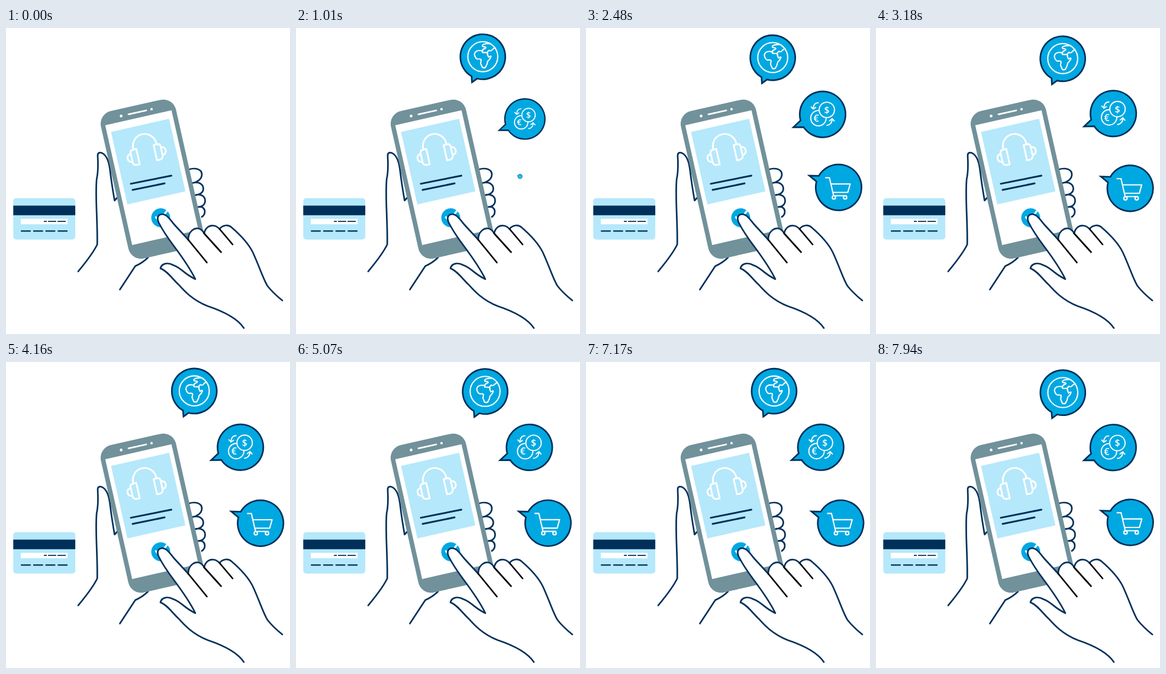
An HTML page that plays this animation: 480x516 px, repeating every 8 s.

```html
<!DOCTYPE html>
<html lang="en">
<head>
<meta charset="utf-8">
<title>Mobile shopping</title>
<style>
  html, body { margin: 0; width: 100%; height: 100%; overflow: hidden; background: #fff; }
  svg { display: block; width: 100%; height: 100%; }
  .line, .white { fill: none; stroke-linecap: round; stroke-linejoin: round; }
  .line { stroke: #00305a; stroke-width: 2.7; }
  .white { stroke: #fff; stroke-width: 2.1; }
  .navy { fill: #00305a; }
  .pale { fill: #b5e8fb; }
  .shape { fill: #00a8e2; stroke: #00305a; stroke-width: 2.7; stroke-miterlimit: 8; }
  .coin { font: 600 16px "Open Sans", sans-serif; fill: #fff; text-anchor: middle; }
  .bubble { visibility: hidden; }
</style>
</head>
<body>
<svg viewBox="0 0 480 516">
  <!-- bank card -->
  <rect class="pale" x="12.3" y="287" width="104.8" height="69.7" rx="5"/>
  <rect class="navy" x="12.3" y="299.5" width="104.8" height="16.2"/>
  <rect x="25" y="321.8" width="79" height="9.2" fill="#fff"/>
  <path d="M64 326.2h5M71 326.2h14M87 326.2h14" stroke="#00305a" stroke-width="1.7"/>
  <path d="M25.2 342.3h16.6M46 342.3h16.6M66.7 342.3h16.6M87.4 342.3h16.6" stroke="#00305a" stroke-width="2.3"/>

  <!-- holding hand -->
  <g class="line">
    <path d="M122 410.5C133 397 146 382 154.2 365C155 325 150.5 285 153.2 255C157 238 155 224 155 214C155.5 209 161 209 165 212.5C173 219 175 232 176.5 245C178.500 262 181 276 183.500 291L188 286"/>
    <path d="M192.500 441L218.500 401.500Q231 396 240 387"/>
    <path d="M309 238.500C320 235 331 238 331 247C331 255 323 260 315 261.500C325 258 333.500 263 333.500 271C333.500 278 327 281 319 282C329 278.500 337 284 336.500 292C336 299 330 302 324 302C331 300 336 304 336 309.500C336 314 333.500 317 331 318.500"/>
  </g>

  <!-- phone -->
  <g transform="translate(246.5 252.3) rotate(-12.7)">
    <rect x="-65" y="-124.700" width="130" height="254.700" rx="22" fill="#71919b"/>
    <rect x="-57.4" y="-103.500" width="114.800" height="207" fill="#fff"/>
    <rect class="pale" x="-50.3" y="-90.400" width="100.500" height="125.400"/>
    <g class="white" style="stroke-width:2.9">
      <path d="M-20-53v-2a20 20 0 0 1 40 0v2"/>
      <path id="cup" d="M-15-53V-26.500H-20Q-26-27-26-33V-48Q-26-53-21-53ZM-26-47Q-33-46-33-40Q-33-34-26-33"/>
      <use href="#cup" transform="scale(-1 1)"/>
    </g>
  </g>
  <path class="white" style="stroke-width:2.8" d="M207 145.700L237 139"/>
  <circle cx="194.600" cy="148.400" r="2.300" fill="#fff"/>
  <circle cx="246" cy="136.900" r="2.100" fill="#fff"/>
  <path class="line" style="stroke-width:3" d="M211 262.600L279.500 249M214 273L268 262"/>
  <circle cx="261.500" cy="320" r="16" fill="#00a8e2"/>
  <path class="white" style="stroke-width:3.2" d="M253.500 319L259 326L271.500 309"/>

  <!-- tapping hand -->
  <path class="line" style="fill:#fff" d="M402 506C392 491 368 478 341 469C315 459 300 442 292 433C282 424 272 409 261 405.500C263 396 274 395 283 400C297 405 300 414 320 423.500C311 405 296 384 284 368C272 352 263 338 258 328C254 319 258 314 264 314C272 314 278 324 284 331L308 357C308 343 318 337 325 338C330 339 333 343 335 346C337 336 345 332 352 333.500C356 334 359 337 361 339C366 332 376 331 381 336C395 348 409 362 417 378C429 404 435 424 442 435C449 444 459 453 467 459.500"/>
  <path d="M308 357L339.500 395.500M334.500 346L363.500 378M361 339L383 365" stroke="#000" stroke-width="2.7" stroke-linecap="round"/>

  <!-- globe -->
  <g class="bubble">
    <path class="shape" d="M-19.300 32.800L-18.500 43L-9.800 36.700A38 38 0 1 0-19.300 32.800Z"/>
    <g class="white">
      <circle cx="-.3" cy="-.3" r="25.300"/>
      <path d="M-14.500-4C-14-9-10-11-4-10.500L-1-10V-7.500L7-7Q8.500-6 7.500-4L9.500.5Q12-1.500 13.500-1Q13 3 8 7.500L7 12L4 18Q2 19-1 18L-4 11L-3 5Q-4 3-9 4Q-13 3-14.500-4Z"/>
      <path d="M13-22C5-23-2-21-1-18C0-16 4-18 5-15.500C5-13-1-14.500-.5-10.500M7-7.500L10-11C14-8 15-12 18-14L20.500-15.500"/>
    </g>
  </g>

  <!-- currency -->
  <g class="bubble">
    <path class="shape" d="M-37.400 10L-49.500 21.500L-32.300 21.200A38.700 38.700 0 1 0-37.400 10Z"/>
    <g class="white" style="stroke-width:1.9">
      <circle cx="-7.200" cy="6.200" r="13"/>
      <circle cx="7" cy="-7.800" r="13" fill="#00a8e2"/>
      <path d="M-7.500-19.800C-13-20-16-15.500-16-9.500M-19.500-12.800L-16-9.200L-11.800-12M7 18.200C12 18 16 14 16 7.500M11.500 10.500L16 7L19.500 11"/>
    </g>
    <text class="coin" x="-11" y="12.200">€</text>
    <text class="coin" x="7" y="-2">$</text>
  </g>

  <!-- cart -->
  <g class="bubble">
    <path class="shape" d="M-33.500-19.300L-49.500-19.800L-37.400-9.800A38.700 38.700 0 1 0-33.500-19.300Z"/>
    <g class="white">
      <path d="M-22-16.300H-15.500L-8.500 14H13M-13.200-5.800H19.500L15.500 8.500H-9.800"/>
      <circle cx="-8" cy="17" r="2.800" fill="#00a8e2"/>
      <circle cx="11" cy="17" r="2.800" fill="#00a8e2"/>
    </g>
  </g>
</svg>
<script>
  const LOOP = 8000, START = 240, STEP = 70, TURN = 5595, GROW = 600;
  const times = [1000, 1710, 2690, 3180, 4160, 5210, 5560];
  const bubbles = [
    { begin: 194, tip: [-18.5, 43],
      x: [316, 316.8, 315.7, 315.9, 318.5, 320.1, 320.4],
      y: [48.6, 47.8, 50.8, 51.9, 49, 50, 50.7] },
    { begin: 542, tip: [-49.5, 21.5],
      x: [393, 396.5, 400.8, 401.2, 396.3, 394.3, 394.2],
      y: [151, 148.8, 145.2, 144.5, 144, 144.3, 145] },
    { begin: 890, tip: [-49.5, -19.8],
      x: [423, 424, 427.8, 429.6, 430.2, 425.3, 424],
      y: [268, 268.2, 269, 270.3, 271.8, 271.7, 272.5] }
  ];
  const nodes = document.querySelectorAll('.bubble');
  const clamp = (v, lo, hi) => Math.min(hi, Math.max(lo, v));

  // smooth curve through the points, slopes taken from the neighbours
  function curve(v, t) {
    const last = times.length - 1;
    t = clamp(t, times[0], times[last]);
    let i = 0;
    while (i < last - 1 && t > times[i + 1]) i++;
    const slope = k => {
      const a = Math.max(k - 1, 0), b = Math.min(k + 1, last);
      return (v[b] - v[a]) / (times[b] - times[a]);
    };
    const d = times[i + 1] - times[i], u = (t - times[i]) / d, w = 1 - u;
    return v[i] * (1 + 2 * u) * w * w + v[i + 1] * u * u * (3 - 2 * u)
      + d * u * w * (slope(i) * w - slope(i + 1) * u);
  }

  function draw(now) {
    let t = now % LOOP;
    t = t < START ? 0 : START + Math.floor((t - START) / STEP) * STEP;
    const drift = t > TURN ? 2 * TURN - t : t;
    bubbles.forEach((b, i) => {
      const p = clamp((t - b.begin) / GROW, 0, 1);
      const s = p * p * (3 - 2 * p);
      const x = curve(b.x, drift) + b.tip[0] * (1 - s);
      const y = curve(b.y, drift) + b.tip[1] * (1 - s);
      nodes[i].style.visibility = s > 0 ? 'visible' : 'hidden';
      nodes[i].setAttribute('transform', `translate(${x} ${y}) scale(${s})`);
    });
  }

  let origin;
  function tick(now) {
    if (origin === undefined) origin = now;
    draw(now - origin);
    requestAnimationFrame(tick);
  }
  requestAnimationFrame(tick);
</script>
</body>
</html>
```
